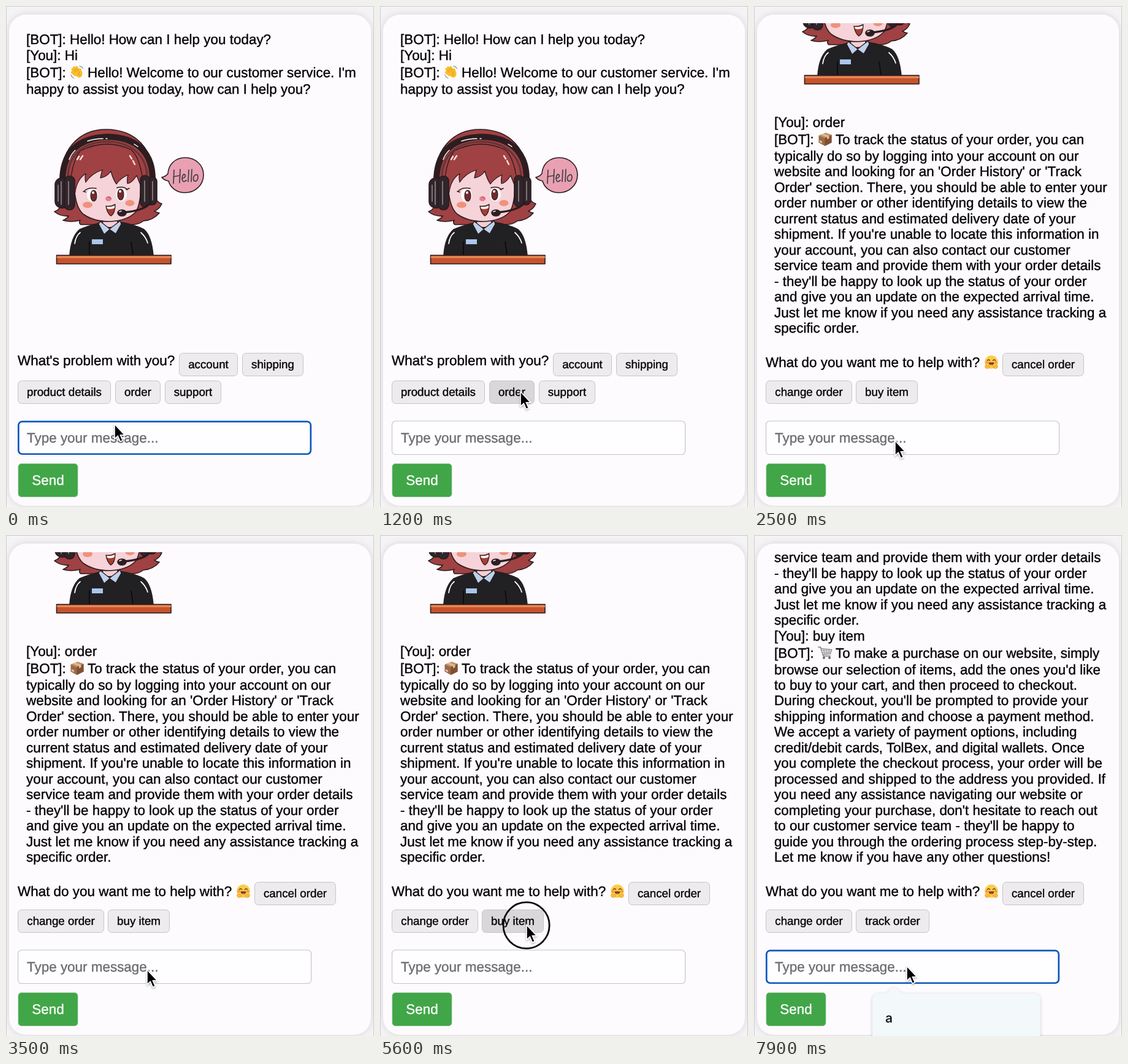
Write an HTML page that moves like this. It is 600 px wide and 816 px high and loops after 8000 ms.

```html
<!DOCTYPE html>
<html lang="en">
<head>
<meta charset="utf-8">
<title>Customer service chat</title>
<style>
html, body { margin: 0; width: 100%; height: 100%; overflow: hidden; background: #f5f3f6; }
svg { display: block; width: 600px; height: 816px; }
text {
  font: 22.45px "Liberation Sans", Arial, sans-serif; color: #060507;
  fill: currentColor; stroke: currentColor; stroke-width: .4;
  text-rendering: geometricPrecision; white-space: pre;
}
.btn rect { fill: #edebee; stroke: #c6c4c7; }
.btn.hover rect { fill: #d9d7da; }
.btn text { font-size: 18.75px; text-anchor: middle; }
#popup text { font: 600 21px Inter, sans-serif; color: #1c1e20; stroke: none; }
</style>
</head>
<body>
<svg viewBox="0 0 600 816" xmlns="http://www.w3.org/2000/svg">
  <defs>
    <clipPath id="view"><rect x="18" y="28" width="572" height="520"/></clipPath>
    <filter id="cardShadow" x="-10%" y="-10%" width="120%" height="120%">
      <feDropShadow dx="0" dy="0" stdDeviation="6" flood-opacity=".13"/>
    </filter>
    <filter id="softShadow" x="-30%" y="-30%" width="160%" height="160%">
      <feDropShadow dx="0" dy="1.5" stdDeviation="1.8" flood-opacity=".35"/>
    </filter>
    <filter id="popupShadow" x="-10%" y="-20%" width="120%" height="140%">
      <feDropShadow dx="0" dy="1" stdDeviation="2.5" flood-opacity=".2"/>
    </filter>

    <g id="wave" stroke-linecap="round" fill="none">
      <g stroke="#f9bd2c" stroke-width="4.2">
        <path d="M11 14L4.5 7M13 12L7 4.500M15.500 11L11 4M18 13L16.500 7.500M9 16L4 12"/>
      </g>
      <path d="M7 13L15 8.500Q21 9 20.500 15Q19.500 21 14.500 20.500Q10 19 7 13Z" fill="#f9bd2c"/>
      <path d="M9 11.500L6 8M11.500 10L8.500 6M14 9.500L12 6.500M16 11Q13 14 15 17" stroke="#d98f1c" stroke-width=".9"/>
      <path d="M16 2Q20 2.500 21.500 6M2 16Q3 20 7 21.500" stroke="#8fa6b4" stroke-width="1.3"/>
    </g>
    <g id="parcel">
      <path d="M1.500 5.500L13 1L22.500 4.500V17L11.500 22.500L1.500 17Z" fill="#9c6a45"/>
      <path d="M1.500 5.500L13 1L22.500 4.500L11.500 9.500Z" fill="#c6936a"/>
      <path d="M11.500 9.500L22.500 4.500V17L11.500 22.500Z" fill="#7e4f32"/>
      <path d="M5.500 3.900L9 2.600L18.500 6.300V10L15 11.500V8Z" fill="#e2bd94"/>
      <path d="M3 13L7 15V18L3 16Z" fill="#d9c7b8"/>
    </g>
    <g id="cart" fill="none" stroke="#85848a" stroke-linecap="round" stroke-linejoin="round">
      <path d="M1 2.500H4.500L9 17H20.500" stroke-width="1.600"/>
      <path d="M5 5L23 6.500L20.500 13.500L8 14.500Z" fill="#e6e5e8" stroke-width="1.100"/>
      <path d="M6 8.200L22 9M7 11.500L21 11.500M9.500 5.500L11 14.200M14 6L14.500 14M18.500 6L17.500 13.800" stroke-width=".7"/>
      <circle cx="10" cy="20" r="1.700" fill="#55545a"/><circle cx="19" cy="20" r="1.700" fill="#55545a"/>
    </g>
    <g id="hug">
      <circle cx="12" cy="11.500" r="10.700" fill="#fdcb45"/>
      <g fill="none" stroke="#70431b" stroke-width="1.400" stroke-linecap="round">
        <path d="M5.500 9Q7.500 6 9.500 9M14.500 9Q16.500 6 18.500 9"/>
      </g>
      <g fill="#f58b54" opacity=".8"><circle cx="4.500" cy="12" r="2.200"/><circle cx="19.500" cy="12" r="2.200"/></g>
      <path d="M7.500 12H16.500Q16 16.500 12 16.500Q8 16.500 7.500 12Z" fill="#753b1b"/>
      <path d="M9.500 15.300Q12 13.500 14.500 15.300Q12 17 9.500 15.300Z" fill="#e7634f"/>
      <g fill="#fbbd3a" stroke="#d98e22" stroke-width=".6">
        <path d="M1.500 18.500Q2 15.500 4.500 16.500L9.500 18.500Q9 22 5.500 22Q2 22 1.500 18.500Z"/>
        <path d="M22.500 18.500Q22 15.500 19.500 16.500L14.500 18.500Q15 22 18.500 22Q22 22 22.500 18.500Z"/>
      </g>
    </g>

    <g id="agent" stroke="#2a1b1e" stroke-width="1.600" stroke-linejoin="round" stroke-linecap="round">
      <path d="M90 285C88 235 118 201 163 201C211 201 241 232 241 285L242 308Q245 320 254 322Q250 331 242 334Q247 337 250 337Q240 349 224 350Q216 357 200 356H122Q118 353 121 349Q105 353 93 349Q99 347 102 342Q89 343 79 335Q90 331 92 318Z" fill="#a04143"/>
      <path d="M158 342H182V362L169 374L157 362Z" fill="#f4cfd4"/>
      <path d="M104 406Q106 376 120 364Q134 358 154 353Q168 369 186 352Q210 356 225 364Q237 374 240 406Z" fill="#212124"/>
      <path d="M154 351L169 363L186 350L188 355L179 371L169 364L160 372L151 355Z" fill="#bdd2ec" stroke-width="1.200"/>
      <path d="M136 384V405M204 384L207 405" fill="none" stroke="#09090b"/>
      <path d="M112 387Q114 374 121 369M220 369Q228 376 231 386" fill="none" stroke="#fff" stroke-width="1.700"/>
      <rect x="140" y="380" width="18" height="8" fill="#abc6eb" stroke="none"/>
      <path d="M111 276Q110 326 126 339Q143 351 169 351Q197 350 211 336Q222 322 220 266Q165 240 111 276Z" fill="#f6d3d8"/>
      <path d="M105 301Q105 257 121 236Q162 215 204 234Q222 250 224 301Q218 290 213 276Q205 289 198 289Q197 281 199 275Q186 281 180 290Q174 281 171 269Q164 279 154 280Q155 274 157 267Q139 273 130 287Q128 279 130 273Q116 282 113 302Z" fill="#a04143" stroke-width="1.300"/>
      <path d="M105 304Q104 282 111 267L117 267Q111 285 114 304ZM225 304Q224 279 218 267L214 270Q220 287 219 304Z" fill="#a04143" stroke="none"/>
      <path d="M92 285C92 237 119 215 164 213C211 213 239 237 239 282" fill="none" stroke="#2d1d20" stroke-width="10"/>
      <path d="M101 276C103 240 128 222 164 221C201 221 227 240 230 275" fill="none" stroke="#653437" stroke-width="3"/>
      <path d="M133 220Q145 216 158 216M163 216H165M103 250Q107 240 113 235M209 225L215 229" fill="none" stroke="#fff" stroke-width="1.500"/>
      <path d="M119 245L116 250M125 244L121 250M202 244L205 249M207 252L210 258" fill="none" stroke="#f5dad9" stroke-width="2.500"/>
      <g fill="#30252a">
        <rect x="80" y="280" width="24" height="49" rx="11"/>
        <rect x="95" y="277" width="17" height="55" rx="8"/>
        <rect x="229" y="278" width="17" height="46" rx="8"/>
        <rect x="219" y="276" width="15" height="51" rx="7"/>
      </g>
      <path d="M85 292V318M90 286V323M102 286V323M226 285V318M239 286V316" fill="none" stroke="#807478" stroke-width="2"/>
      <g stroke-width="1.100">
        <ellipse cx="141" cy="308" rx="9" ry="11" fill="#fffafa" stroke="none"/>
        <ellipse cx="188" cy="307" rx="9" ry="11" fill="#fffafa" stroke="none"/>
        <ellipse cx="143" cy="309" rx="5" ry="9" fill="#74292c"/>
        <ellipse cx="187" cy="307" rx="5" ry="9" fill="#74292c"/>
      </g>
      <path d="M128 301Q134 295 147 297M181 296Q192 293 198 299M130 303L126 302M196 299L201 297" fill="none"/>
      <g fill="#fff" stroke="none"><circle cx="142" cy="304" r="2"/><circle cx="186" cy="302" r="2"/></g>
      <g fill="#ef927c" stroke="none">
        <ellipse cx="133" cy="324" rx="8" ry="5"/><ellipse cx="202" cy="321" rx="7.500" ry="5"/>
        <ellipse cx="167" cy="314" rx="5" ry="4" fill="#e97d93"/>
      </g>
      <path d="M166 311Q170 310 171 314" fill="none" stroke="#963f4d" stroke-width="1"/>
      <path d="M163 326Q171 327 178 323Q178 338 171 342Q165 338 163 326Z" fill="#a83d34" stroke-width="1.300"/>
      <path d="M164 327Q171 328 177 325L177 329Q171 332 165 330Z" fill="#fff" stroke="none"/>
      <path d="M236 320Q225 334 191 336" fill="none" stroke-width="3.500"/>
      <ellipse cx="189" cy="337" rx="7" ry="5" fill="#2a2023"/>
      <path d="M185 335L188 334" fill="none" stroke="#eee"/>
      <rect x="82.500" y="406" width="186.500" height="14" fill="#c5532b"/>
      <path d="M84 409H268" fill="none" stroke="#e78d5c" stroke-width="3"/>
      <path d="M254 279Q260 278 264 273C265 257 277 247 292 247C309 247 322 259 322 275C322 292 308 304 292 304C278 304 268 296 265 285Q258 284 254 279Z" fill="#e9a0b3"/>
      <path aria-label="Hello" d="M274 267L273 289M284 266L283 288M273 278L284 276M287 281Q294 279 292 275Q288 272 287 281Q288 289 294 284M298 267L297 286M303 266L302 286M309 275Q304 278 306 284Q311 288 313 280Q313 273 309 275" fill="none" stroke="#3f3e43" stroke-width="1.700"/>
    </g>
  </defs>

  <rect width="600" height="816" fill="#f5f3f6"/>
  <rect x="5" y="14" width="590" height="800" rx="28" fill="#fdfbfe" filter="url(#cardShadow)"/>
  <path d="M0 .5H600M.5 0V816M599.500 0V816" stroke="#cbc9cc" fill="none"/>

  <g clip-path="url(#view)"><g id="log"></g></g>
  <rect id="thumb" x="576" width="12.500" rx="6.250" fill="#79777a"/>
  <g id="prompts"></g>

  <rect id="field" rx="6"/>
  <text x="34" y="711" style="color:#6f6d72">Type your message...</text>
  <rect x="20" y="745.500" width="97" height="54" rx="5" fill="#41a647" stroke="#8cc38f" stroke-width=".9"/>
  <text x="68.500" y="780" text-anchor="middle" style="color:#fff">Send</text>

  <g id="popup">
    <path d="M205 747H213Q217 747 220 743L225 738.500Q228.500 735.500 232 738.500L237 743Q240 747 244 747H455Q467 747 467 759V830H193V759Q193 747 205 747Z" fill="#f3f8fa" filter="url(#popupShadow)"/>
    <text x="214" y="794">a</text>
  </g>
  <circle id="ring" r="37.600" fill="none" stroke="#0c0c0d" stroke-width="2.800"/>
  <path id="pointer" d="M0 0V24L5.300 19.300L9.300 28.500L13.300 26.800L9.400 17.800H16.500Z" fill="#000" stroke="#fff" stroke-width="1.600" filter="url(#softShadow)"/>
</svg>
<script>
const LOOP = 8000, STEP = 100, LINE = 25.45, LEFT = 33;
const $ = id => document.getElementById(id);
const set = (el, attrs) => { for (const k in attrs) el.setAttribute(k, attrs[k]); };
const show = (el, on) => { el.style.display = on ? "" : "none"; };
const text = (x, y, s) => `<text x="${x}" y="${y}">${s}</text>`;
const icon = (id, x, y) => `<use href="#${id}" x="${x}" y="${y}"/>`;

// One question and its reply; the icon makes the reply's first line taller.
function exchange(y, said, iconId, lines) {
  const rows = lines.map((s, i) => i
    ? text(LEFT, y + 55 + (i - 1) * LINE, s)
    : text(LEFT + 100, y + 28, s));
  return `<g>${text(LEFT, y, "[You]: " + said)}${text(LEFT, y + 28, "[BOT]:")}
    ${icon(iconId, 104, y + 8.5)}${rows.join("")}</g>`;
}

$("log").innerHTML =
  text(LEFT, 62, "[BOT]: Hello! How can I help you today?") +
  exchange(87.5, "Hi", "wave", [
    "Hello! Welcome to our customer service. I'm",
    "happy to assist you today, how can I help you?"]) +
  icon("agent", 0, 0) +
  exchange(490, "order", "parcel", [
    "To track the status of your order, you can",
    "typically do so by logging into your account on our",
    "website and looking for an 'Order History' or 'Track",
    "Order' section. There, you should be able to enter your",
    "order number or other identifying details to view the",
    "current status and estimated delivery date of your",
    "shipment. If you're unable to locate this information in",
    "your account, you can also contact our customer",
    "service team and provide them with your order details",
    "- they'll be happy to look up the status of your order",
    "and give you an update on the expected arrival time.",
    "Just let me know if you need any assistance tracking a",
    "specific order."]) +
  exchange(850.4, "buy item", "cart", [
    "To make a purchase on our website, simply",
    "browse our selection of items, add the ones you'd like",
    "to buy to your cart, and then proceed to checkout.",
    "During checkout, you'll be prompted to provide your",
    "shipping information and choose a payment method.",
    "We accept a variety of payment options, including",
    "credit/debit cards, TolBex, and digital wallets. Once",
    "you complete the checkout process, your order will be",
    "processed and shipped to the address you provided. If",
    "you need any assistance navigating our website or",
    "completing your purchase, don't hesitate to reach out",
    "to our customer service team - they'll be happy to",
    "guide you through the ordering process step-by-step.",
    "Let me know if you have any other questions!"]);
const replies = [...$("log").querySelectorAll(":scope > g")].slice(1);

// Buttons: label, left, right, row
const help = text(19, 588, "What do you want me to help with?") + icon("hug", 375, 568.5);
const common = [["cancel order", 405, 538, 0], ["change order", 19, 160, 1]];
const stages = [
  { at: 0, scroll: 0, ask: text(19, 585, "What's problem with you?"),
    buttons: [["account", 282, 378, 0], ["shipping", 385, 485, 0],
      ["product details", 19, 171, 1], ["order", 178, 252, 1], ["support", 259, 351, 1]] },
  { at: 1500, scroll: 293, thumb: 219, ask: help, buttons: [...common, ["buy item", 166, 267, 1]] },
  { at: 5800, scroll: 678.8, thumb: 327, ask: help, buttons: [...common, ["track order", 166, 286, 1]] }
];
const rowTop = row => 565 + row * 45;

for (const stage of stages) {
  const g = document.createElementNS("http://www.w3.org/2000/svg", "g");
  g.innerHTML = stage.ask + stage.buttons.map(([label, l, r, row]) =>
    `<g class="btn"><rect x="${l + .5}" y="${rowTop(row) + .5}" width="${r - l - 1}" height="37" rx="6"/>
     ${text((l + r) / 2, rowTop(row) + 25, label)}</g>`).join("");
  stage.el = $("prompts").appendChild(g);
  stage.nodes = g.querySelectorAll(".btn");
}

// Pointer: time, x, y
const path = [
  [0, 177, 681], [100, 177, 681], [700, 229, 628], [1400, 229, 628], [1800, 228, 693],
  [2100, 230, 708], [4700, 230, 708], [5300, 239, 635], [5700, 239, 635], [6200, 249, 702], [LOOP, 249, 702]
];
const clicks = [[800, 900], [5500, 5700], [6300, 6500]];
const BLUR = 800, FOCUS = 6500, SUGGEST = 6700;
const clamp = v => Math.min(1, Math.max(0, v));

function pointerAt(t) {
  const i = path.findIndex(p => p[0] > t);
  const [t0, x0, y0] = path[i - 1], [t1, x1, y1] = path[i];
  const u = (t - t0) / (t1 - t0), e = u * u * (3 - 2 * u);
  return [x0 + (x1 - x0) * e, y0 + (y1 - y0) * e];
}

function drawField(focused) {
  const line = focused ? 2.7 : 1.1, inset = line / 2;
  set($("field"), {
    x: 19 + inset, y: 675.5 + inset, width: 479.2 - line, height: 55.6 - line,
    fill: "#fefdff", stroke: focused ? "#0b57bd" : "#c3c1c4", "stroke-width": line
  });
}

function draw(t) {
  const [x, y] = pointerAt(t);
  const now = stages.filter(s => t >= s.at).length - 1;
  const stage = stages[now];

  stages.forEach((s, i) => show(s.el, i === now));
  replies.forEach((r, i) => show(r, i < now));
  set($("log"), { transform: `translate(0 ${-stage.scroll})` });
  stage.buttons.forEach(([, l, r, row], i) => {
    const over = x >= l && x <= r && y >= rowTop(row) && y <= rowTop(row) + 38;
    stage.nodes[i].classList.toggle("hover", over);
  });

  show($("thumb"), now > 0);
  if (now) set($("thumb"), {
    y: stage.thumb, height: 547.5 - stage.thumb,
    opacity: clamp((628 - (t - stage.at)) / 200)
  });

  drawField(t < BLUR || t >= FOCUS);
  show($("popup"), t >= SUGGEST);
  show($("ring"), clicks.some(([a, b]) => t >= a && t < b));
  set($("ring"), { cx: x - .4, cy: y + .8 });
  set($("pointer"), { transform: `translate(${x} ${y})` });
}

function tick() {
  draw(Math.floor(performance.now() % LOOP / STEP) * STEP);
  requestAnimationFrame(tick);
}
tick();
</script>
</body>
</html>
```
